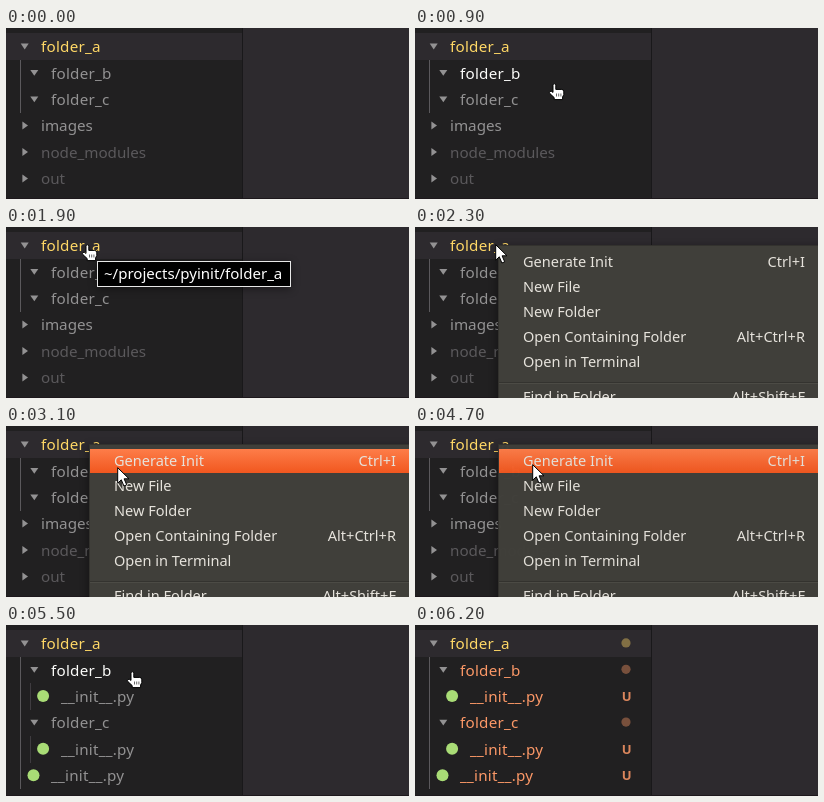
An HTML page that plays this animation: 403 by 171 pixels, repeating every 8000 ms.

```html
<!DOCTYPE html>
<html lang="en">
<head>
<meta charset="utf-8">
<title>Folder tree</title>
<style>
  html, body { margin: 0; width: 100%; height: 100%; overflow: hidden; background: #2d2a2e; }
  svg { display: block; font-family: "Noto Sans", "Open Sans", sans-serif; }
  .row text { font-size: 15.2px; fill: #939293; }
  .row .spaced { letter-spacing: .25px; }
  .row.ignored text { fill: #5b595c; }
  .row.hover text { fill: #fcfcfa; }
  .marked .row text { fill: #fc9867; }
  .row.selected text { fill: #ffd866; }
  .arrow { fill: #939293; }
  .icon { fill: #a9dc76; }
  .badge { visibility: hidden; fill: #fc9867; }
  .marked .badge { visibility: visible; }
  .badge circle { opacity: .4; }
  .selected .badge { fill: #ffd866; }
  .row .badge text { font-size: 13px; font-weight: 600; opacity: .85; }
  .guide { stroke: #5b595c; }
  .inner { stroke: #3f3c40; }
  #menu { font-size: 14.55px; fill: #e6e3dc; }
  #menu .panel { fill: #403f3a; stroke: #33322e; filter: drop-shadow(0 3px 5px rgba(0, 0, 0, .45)); }
  #tip { font-size: 15.05px; fill: #fff; }
  #tip rect { fill: #000; stroke: #e8e8e8; filter: drop-shadow(0 2px 4px rgba(0, 0, 0, .4)); }
  #hand path, #pointer path { fill: #fff; stroke: #000; stroke-linejoin: round; }
</style>
</head>
<body>
<svg width="403" height="171" viewBox="0 0 403 171">
  <defs>
    <linearGradient id="orange" x2="0" y2="1">
      <stop stop-color="#fd7d49"/>
      <stop offset="1" stop-color="#f1571f"/>
    </linearGradient>
  </defs>
  <rect width="403" height="171" fill="#2d2a2e"/>
  <rect width="236" height="171" fill="#212021"/>
  <rect y="5" width="236" height="27" fill="#2d2a2e"/>
  <rect x="236" width="1" height="171" fill="#19181a"/>
  <rect y="170" width="403" height="1" fill="#1d181c"/>

  <g id="before"><path class="guide" d="M14.5 32V85"/></g>
  <g id="after">
    <path class="guide" d="M14.5 32V164"/>
    <path id="inner" class="inner" d="M24.5 58V85M24.5 111V138"/>
  </g>

  <g id="tip">
    <rect x="91.5" y="34.5" width="193" height="25"/>
    <text x="98" y="52">~/projects/pyinit/folder_a</text>
  </g>

  <g id="menu">
    <rect class="panel" x="83.5" y="18.5" width="340" height="180"/>
    <rect id="active" x="84" y="23" width="330" height="24" fill="url(#orange)"/>
    <path d="M84 155.5H403" stroke="#34332f"/>
    <path d="M84 156.5H403" stroke="#4c4b45"/>
  </g>

  <g id="hand">
    <path d="M4 2.2Q4 .8 5.4 .8T6.8 2.2V6.4H12.8Q14.8 6.6 14.8 8.8V11.5L13.6 14V16.6H5.2V14.6L.9 10.6Q-.2 9.2 1 8.4Q2.2 7.8 4 9.4Z"/>
    <path d="M7.5 10.5V13.5M9.7 10.5V13.5M11.9 10.5V13.5" stroke-width=".6"/>
  </g>
  <g id="pointer">
    <path d="M.7 .7V16.2L4.3 12.8L6.9 19L9.7 17.8L7.1 11.8H12Z"/>
  </g>
</svg>
<script>
const LOOP = 8000, TICK = 100, ROW = 26.4, TOP = 5.5;
const $ = id => document.getElementById(id);

function add(parent, tag, attrs, text) {
  const el = document.createElementNS("http://www.w3.org/2000/svg", tag);
  for (const key in attrs) el.setAttribute(key, attrs[key]);
  if (text) el.textContent = text;
  parent.append(el);
  return el;
}

// Row kinds: "open" and "shut" folders, "file"
function buildTree(parent, items) {
  return items.map(([label, depth, kind, state = ""], i) => {
    const row = add(parent, "g", { class: "row " + state, transform: `translate(0 ${i * ROW})` });
    const x = 18.7 + 9.6 * depth;
    if (kind === "file") add(row, "circle", { class: "icon", cx: x - .8, cy: 18.2, r: 6 });
    else add(row, "path", {
      class: "arrow",
      d: kind === "open" ? `M${x - 4} 15.6h8l-4 5.8z` : `M${x - 2.3} 14.4v8l5.6-4z`
    });
    const spaced = /^(folder|__)/.test(label) ? "spaced" : "";
    add(row, "text", { class: spaced, x: 35 + 10 * depth, y: 24.2 }, label);
    const badge = add(row, "g", { class: "badge" });
    if (kind === "file") add(badge, "text", { x: 211.7, y: 23.1, "text-anchor": "middle" }, "U");
    else add(badge, "circle", { cx: 211, cy: 17.9, r: 4.6 });
    return row;
  });
}

const rowsBefore = buildTree($("before"), [
  ["folder_a", 0, "open", "selected"],
  ["folder_b", 1, "open"],
  ["folder_c", 1, "open"],
  ["images", 0, "shut"],
  ["node_modules", 0, "shut", "ignored"],
  ["out", 0, "shut", "ignored"]
]);
const rowsAfter = buildTree($("after"), [
  ["folder_a", 0, "open", "selected"],
  ["folder_b", 1, "open"],
  ["__init__.py", 2, "file"],
  ["folder_c", 1, "open"],
  ["__init__.py", 2, "file"],
  ["__init__.py", 1, "file"]
]);

[
  ["Generate Init", "Ctrl+I", 40],
  ["New File", "", 65],
  ["New Folder", "", 90],
  ["Open Containing Folder", "Alt+Ctrl+R", 115],
  ["Open in Terminal", "", 140],
  ["Find in Folder", "Alt+Shift+F", 175]
].forEach(([label, keys, y]) => {
  add($("menu"), "text", { x: 108, y }, label);
  if (keys) add($("menu"), "text", { x: 390, y, "text-anchor": "end" }, keys);
});

// Cursor stops: time, x, y
const stops = [
  [500, 254, 129], [900, 134, 54.5], [1300, 92, 29], [1800, 76, 17], [2200, 76, 17],
  [2300, 80, 17], [2700, 80, 17], [3100, 111, 41], [3200, 111, 41], [3300, 117, 38],
  [4700, 117, 38], [4800, 112, 38], [5400, 112, 38], [5500, 121, 46], [6000, 236, 160]
];

function cursorAt(t) {
  const i = stops.findIndex(s => s[0] >= t);
  if (i < 0 || t < stops[0][0]) return null;
  const b = stops[i], a = stops[i - 1] || b;
  const k = a === b ? 1 : (t - a[0]) / (b[0] - a[0]);
  return [a[1] + (b[1] - a[1]) * k, a[2] + (b[2] - a[2]) * k];
}

function show(el, on) {
  el.style.display = on ? "" : "none";
}

function draw(now) {
  const t = Math.floor(now % LOOP / TICK) * TICK;
  const within = (from, to) => t >= from && t < to;
  const pos = cursorAt(t);
  const menuOpen = within(2300, 4800);
  const inTree = pos && !menuOpen && pos[0] < 236;
  const hovered = inTree ? Math.floor((pos[1] - TOP) / ROW) : -1;
  const created = t >= 5500;

  show($("before"), !created);
  show($("after"), created);
  show($("inner"), inTree);
  $("after").classList.toggle("marked", t >= 6200);
  for (const rows of [rowsBefore, rowsAfter])
    rows.forEach((row, i) => row.classList.toggle("hover", i === hovered));

  show($("tip"), within(1900, 2300));
  show($("menu"), within(2300, 4900));
  $("menu").style.opacity = t < 4700 ? 1 : t < 4800 ? .98 : .35;
  show($("active"), t >= 2800);

  show($("hand"), inTree);
  show($("pointer"), pos && !inTree);
  if (pos) {
    const [x, y] = pos.map(Math.round);
    for (const id of ["hand", "pointer"]) $(id).setAttribute("transform", `translate(${x} ${y})`);
  }
}

function loop() {
  draw(performance.now());
  requestAnimationFrame(loop);
}
loop();
</script>
</body>
</html>
```
